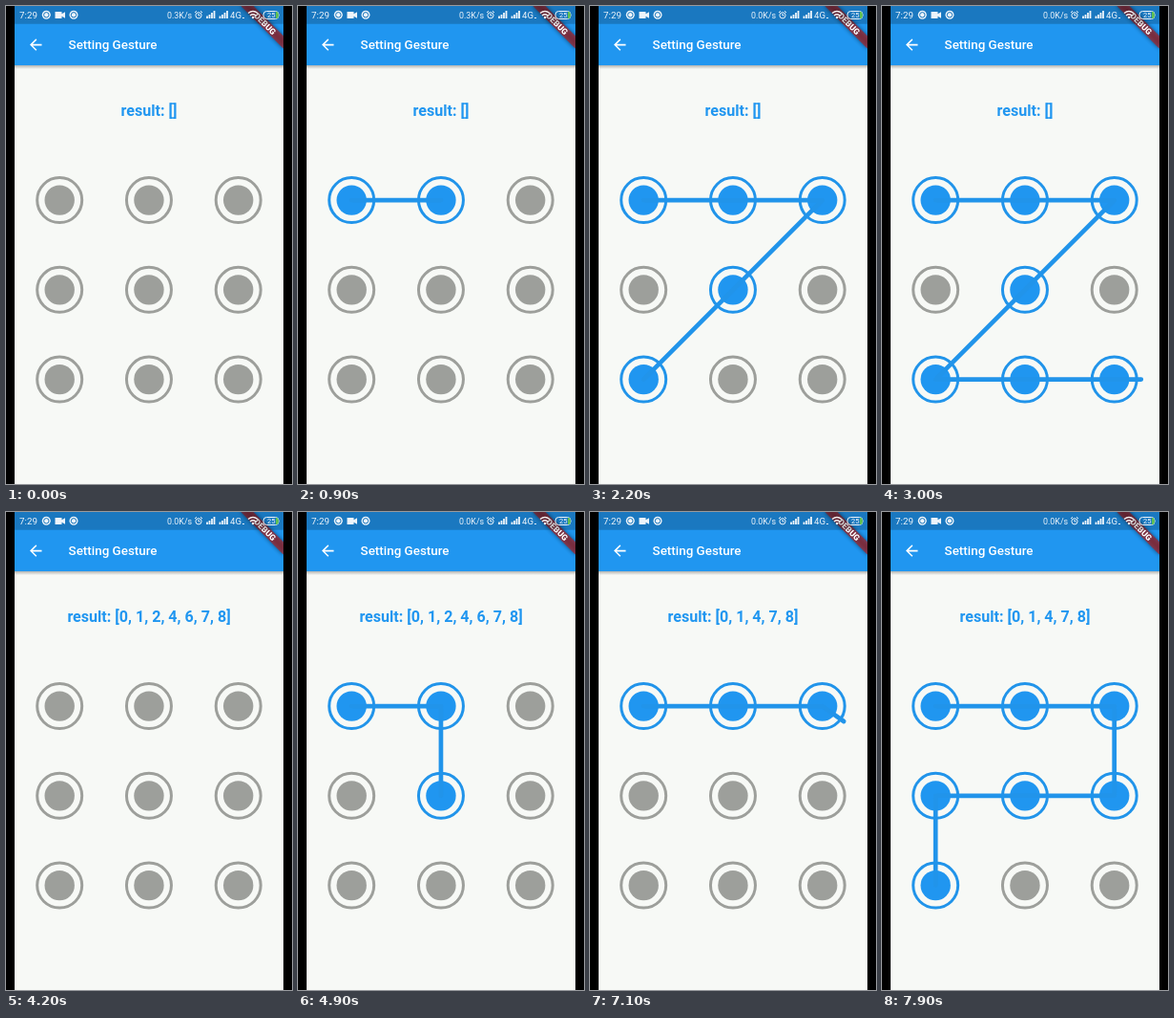
Write an HTML page that moves like this. It is 300 px wide and 500 px high and loops after 8000 ms.

```html
<!DOCTYPE html>
<html lang="en">
<head>
<meta charset="utf-8">
<title>Setting Gesture</title>
<style>
  html, body { margin: 0; width: 100%; height: 100%; overflow: hidden; background: #000; }
  svg { display: block; width: 300px; height: 500px; font-family: Roboto, sans-serif; }
  .node { fill: #9d9f9b; stroke: #9d9f9b; }
  .node.on { fill: #2096f0; stroke: #2194ea; }
  .ring { fill: none; stroke-width: 3; }
  .dot { stroke: none; }
</style>
</head>
<body>
<svg viewBox="0 0 300 500">
  <defs>
    <linearGradient id="shade" x2="0" y2="1">
      <stop stop-color="#000" stop-opacity=".28"/>
      <stop offset="1" stop-color="#000" stop-opacity="0"/>
    </linearGradient>
    <clipPath id="screen"><rect x="9" width="282" height="500"/></clipPath>
    <filter id="soft" x="-20%" y="-60%" width="140%" height="220%"><feGaussianBlur stdDeviation="2"/></filter>
    <g id="record">
      <circle r="4.5" fill="#fff"/>
      <circle r="2.7" fill="none" stroke="#1a76bc"/>
    </g>
    <path id="signal" d="M1 13V10.5M3.5 13V9M6 13V7M8.5 13V5" stroke="#fff" stroke-width="1.8"/>
  </defs>

  <g clip-path="url(#screen)">
    <rect width="300" height="500" fill="#f7f9f6"/>
    <rect y="62" width="300" height="4" fill="url(#shade)"/>
    <rect width="300" height="62" fill="#2096f0"/>

    <g fill="#fff">
      <path transform="translate(21.9 31.25) scale(.78)" d="M20 11H7.83l5.59-5.59L12 4l-8 8 8 8 1.41-1.41L7.83 13H20z"/>
      <text x="65.6" y="45" font-size="13.4" font-weight="500">Setting Gesture</text>
    </g>

    <g transform="translate(290.6 0) rotate(45)">
      <rect x="-31.25" y="21.9" width="62.5" height="9.4" opacity=".5" filter="url(#soft)"/>
      <rect x="-31.25" y="21.9" width="62.5" height="9.4" fill="#b71c1c" fill-opacity=".63"/>
      <text y="29.6" font-size="8.7" font-weight="900" fill="#fff" text-anchor="middle">DEBUG</text>
    </g>

    <rect width="300" height="18.75" opacity=".2"/>
    <g fill="#fff" opacity=".92">
      <text x="14" y="13" font-size="9.8">7:29</text>
      <use href="#record" x="42.3" y="9.3"/>
      <path d="M51.5 6h7v2.3l3.5-2v6.4l-3.5-2V13h-7z"/>
      <use href="#record" x="71" y="9.3"/>
      <text id="speed" x="169" y="13" font-size="8.9"></text>
      <g fill="none" stroke="#fff">
        <circle cx="202" cy="9.8" r="3.1"/>
        <path d="M202 8v2h1.5M198 7l2-1.8M206 7l-2-1.8"/>
      </g>
      <use href="#signal" x="210"/>
      <use href="#signal" x="223.5"/>
      <text x="235" y="13" font-size="9.6">4G</text>
      <path d="M248 12.5h2" stroke="#fff"/>
      <path d="M254 7.5q5-4 10 0M256 10q3-2.5 6 0" fill="none" stroke="#fff" stroke-width="1.4"/>
      <circle cx="259" cy="12" r="1.2"/>
      <rect x="270" y="5.5" width="16" height="8" rx="3.5" fill="none" stroke="#fff"/>
      <path d="M283 6h1.5q1.5 1 1.5 3.5t-1.5 3.5H283z" fill="#62c54a"/>
      <text x="274" y="12.2" font-size="7.5">25</text>
    </g>

    <text id="result" x="150" y="115" font-size="16.1" font-weight="700" fill="#2096f0" text-anchor="middle"></text>
    <g id="nodes"></g>
    <polyline id="trail" fill="none" stroke="#2194ea" stroke-width="4.7" stroke-linecap="round" stroke-linejoin="round"/>
  </g>
</svg>
<script>
const LOOP = 8000, STEP = 100, GAP = 93.75, HIT = 25;
const $ = id => document.getElementById(id);
const toScreen = (col, row) => [56.2 + GAP * col, 203.1 + GAP * row];

const centers = Array.from({ length: 9 }, (_, i) => toScreen(i % 3, Math.floor(i / 3)));

$('nodes').innerHTML = centers.map(([x, y]) =>
  `<g class="node"><circle class="ring" cx="${x}" cy="${y}" r="23.5"/>` +
  `<circle class="dot" cx="${x}" cy="${y}" r="15.7"/></g>`).join('');
const nodes = [...$('nodes').children];

// Each stroke: release time and the turning points of the finger as [time, column, row]
const strokes = [
  { end: 3200, path: [[500, 0, 0], [1500, 2, 0], [1600, 1.92, .27], [2200, 0, 2], [3000, 2.3, 2]] },
  { end: 5600, path: [[4400, 0, 0], [4700, 1, 0], [5200, 1, 2], [5500, 2, 2]] },
  { end: LOOP, path: [[6300, 0, 0], [6900, 2, 0], [7100, 2.24, .17], [7400, 2, 1], [7800, 0, 1], [7900, 0, 2]] }
];

function fingerAt(path, t) {
  const i = path.findIndex(p => p[0] > t);
  if (i < 0) return toScreen(...path.at(-1).slice(1));
  const [t0, col0, row0] = path[i - 1], [t1, col1, row1] = path[i];
  const k = (t - t0) / (t1 - t0);
  return toScreen(col0 + (col1 - col0) * k, row0 + (row1 - row0) * k);
}

function visited(path, until) {
  const hits = new Set();
  for (let t = path[0][0]; t <= until; t += 10) {
    const [x, y] = fingerAt(path, t);
    const n = centers.findIndex(c => Math.hypot(c[0] - x, c[1] - y) < HIT);
    if (n >= 0) hits.add(n);
  }
  return [...hits];
}

function draw(t) {
  const active = strokes.find(s => t >= s.path[0][0] && t < s.end);
  const done = strokes.findLast(s => t >= s.end);
  const hits = active ? visited(active.path, t) : [];
  const points = active ? [...hits.map(n => centers[n]), fingerAt(active.path, t)] : [];
  nodes.forEach((node, i) => node.classList.toggle('on', hits.includes(i)));
  $('trail').setAttribute('points', points.join(' '));
  $('result').textContent = `result: [${done ? visited(done.path, done.end).join(', ') : ''}]`;
  $('speed').textContent = t < 1000 ? '0.3K/s' : '0.0K/s';
}

function tick() {
  draw(Math.floor(performance.now() % LOOP / STEP) * STEP);
  requestAnimationFrame(tick);
}
tick();
</script>
</body>
</html>
```
